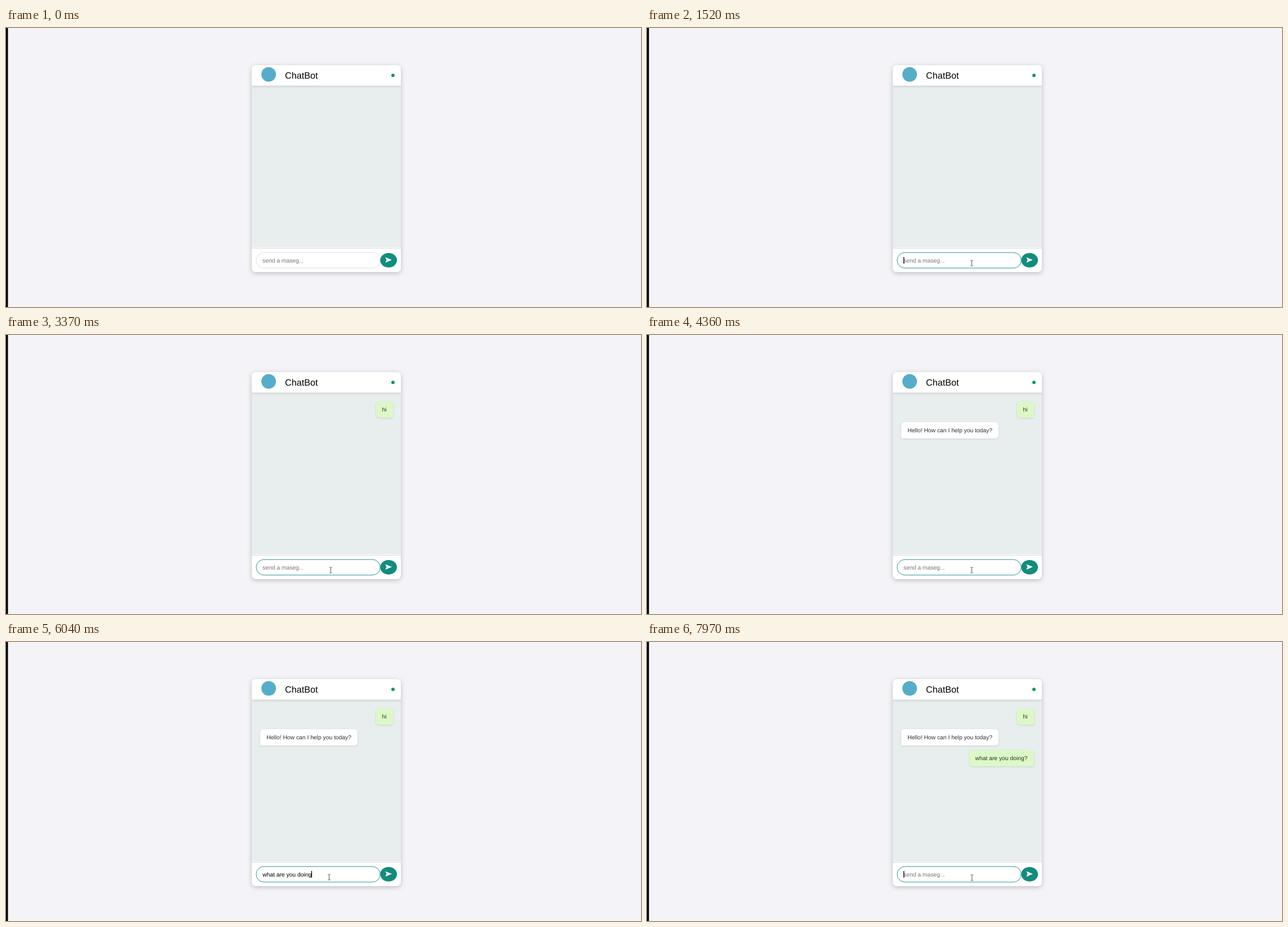
Animation of 1129x496 px, one loop 8000 ms. Source, as an HTML page:

```html
<!DOCTYPE html>
<html lang="en">
<head>
<meta charset="utf-8">
<title>ChatBot</title>
<style>
  html, body { margin: 0; width: 100%; height: 100%; overflow: hidden; background: #f3f3f8; }
  svg { display: block; width: 1129px; height: 496px; }
  text { font: 10.32px "Liberation Sans", Arial, sans-serif; fill: #303030; text-rendering: geometricPrecision; }
  .title { font-size: 16.2px; fill: #000; }
  .card { filter: drop-shadow(0 2px 4px rgba(0, 0, 0, .22)); }
  .head { filter: drop-shadow(0 1px 2px rgba(0, 0, 0, .16)); }
  .bubble path { filter: drop-shadow(0 1px 1.5px rgba(0, 0, 0, .12)); }
  .user path { fill: #dcf8c6; }
  .bot path { fill: #fff; }
</style>
</head>
<body>
<svg viewBox="0 0 1129 496">
  <defs>
    <clipPath id="round"><rect x="437" y="66" width="265" height="368" rx="7"/></clipPath>
  </defs>
  <rect width="1129" height="496" fill="#f3f3f8"/>
  <rect width="3.5" height="496" fill="#000"/>

  <rect class="card" x="437" y="66" width="265" height="368" rx="7" fill="#fff"/>
  <g clip-path="url(#round)">
    <rect x="437" y="102" width="265" height="288" fill="#e7eeed"/>
    <rect class="head" x="437" y="66" width="265" height="36.5" fill="#fff"/>
    <rect x="437" y="391" width="265" height="1" fill="#d8d8d8"/>
  </g>
  <circle cx="467" cy="82.5" r="13" fill="#55adc9"/>
  <text class="title" x="496" y="89.8">ChatBot</text>
  <circle cx="688" cy="84.3" r="3" fill="#12965f"/>

  <g class="bubble user" data-at="3370">
    <path d="M663.6 118H682a6 6 0 0 1 6 6v23h-24.4a6 6 0 0 1-6-6v-17a6 6 0 0 1 6-6z"/>
    <text x="668.6" y="135.6">hi</text>
  </g>
  <g class="bubble bot" data-at="4360">
    <path d="M458 155h161a6 6 0 0 1 6 6v17a6 6 0 0 1-6 6h-167v-23a6 6 0 0 1 6-6z"/>
    <text x="463.2" y="172.6">Hello! How can I help you today?</text>
  </g>
  <g class="bubble user" data-at="7970">
    <path d="M579 192H682a6 6 0 0 1 6 6v23h-109a6 6 0 0 1-6-6v-17a6 6 0 0 1 6-6z"/>
    <text x="583.5" y="209.6">what are you doing?</text>
  </g>

  <rect id="field" x="444.8" y="399.2" width="220.5" height="27.6" rx="13.8" fill="#fff"/>
  <text id="entry" x="456" y="416.6"></text>
  <rect id="caret" y="407" width="1.3" height="12" fill="#000"/>
  <ellipse cx="680.2" cy="412.8" rx="14.9" ry="12.9" fill="#128c7e"/>
  <path d="M674.3 407.4L686 412.3L674.3 417.2L676.6 412.3z" fill="#fff"/>

  <path id="arrow" d="M0 0V11.4L2.7 9L4.4 13L6.2 12.2L4.5 8.4H8z" fill="#fff" stroke="#000" stroke-width=".7"/>
  <path id="beam" d="M-2.3-5H-.6L0-4.5L.6-5H2.3M0-4.5V4.5M-2.3 5H-.6L0 4.5L.6 5H2.3" fill="none" stroke="#444" stroke-width=".9"/>
</svg>
<script>
const LOOP = 8000, FOCUS = 1250;
const $ = id => document.getElementById(id);
const field = $("field"), entry = $("entry"), caret = $("caret"), arrow = $("arrow"), beam = $("beam");
const bubbles = [...document.querySelectorAll(".bubble")];

// Field contents by start time; an empty field shows the placeholder
const typed = [
  [0, ""], [2580, "h"], [2700, "hi"], [3370, ""],
  [6040, "what are you doing"], [7580, "what are you doing?"], [7970, ""]
];
const caretOn = [[1320, 1850], [2310, 3230], [3760, 4290], [4840, 5840], [6040, 6580], [7110, LOOP]];
// Pointer path: time, x, y
const path = [
  [180, 890, 486], [310, 812, 470], [450, 720, 448], [580, 640, 430], [720, 592, 421], [850, 577.4, 418],
  [5250, 577.4, 418], [5380, 582, 414], [5510, 570.5, 421], [5640, 573, 418],
  [6039, 573, 418], [6040, 574.5, 418], [6340, 574.5, 418], [6480, 577.8, 419], [LOOP, 577.8, 419]
];
const show = (el, on) => el.style.display = on ? "" : "none";
const mix = (a, b, k) => a + (b - a) * k;

function pointer(t) {
  const i = path.findIndex(p => p[0] > t);
  const a = path[i - 1], b = path[i], k = (t - a[0]) / (b[0] - a[0]);
  return [mix(a[1], b[1], k), mix(a[2], b[2], k)];
}

function draw(t) {
  bubbles.forEach(b => show(b, t >= +b.dataset.at));

  const text = typed.filter(s => s[0] <= t).pop()[1];
  entry.textContent = text || "send a maseg...";
  entry.style.fill = text ? "#000" : "#757575";
  show(caret, caretOn.some(([on, off]) => t >= on && t < off));
  caret.setAttribute("x", 456 + (text ? entry.getComputedTextLength() - .4 : 0));

  const k = Math.min(1, Math.max(0, (t - FOCUS) / 270));
  field.setAttribute("stroke", `rgb(${mix(221, 38, k)},${mix(221, 150, k)},${mix(225, 137, k)})`);

  const visible = t >= path[0][0];
  const [x, y] = visible ? pointer(t) : [0, 0];
  const overField = x < 665 && y < 427;
  show(arrow, visible && !overField);
  show(beam, visible && overField);
  for (const el of [arrow, beam]) el.setAttribute("transform", `translate(${x} ${y})`);
}

const start = performance.now();
function tick() {
  draw((performance.now() - start) % LOOP);
  requestAnimationFrame(tick);
}
tick();
</script>
</body>
</html>
```
